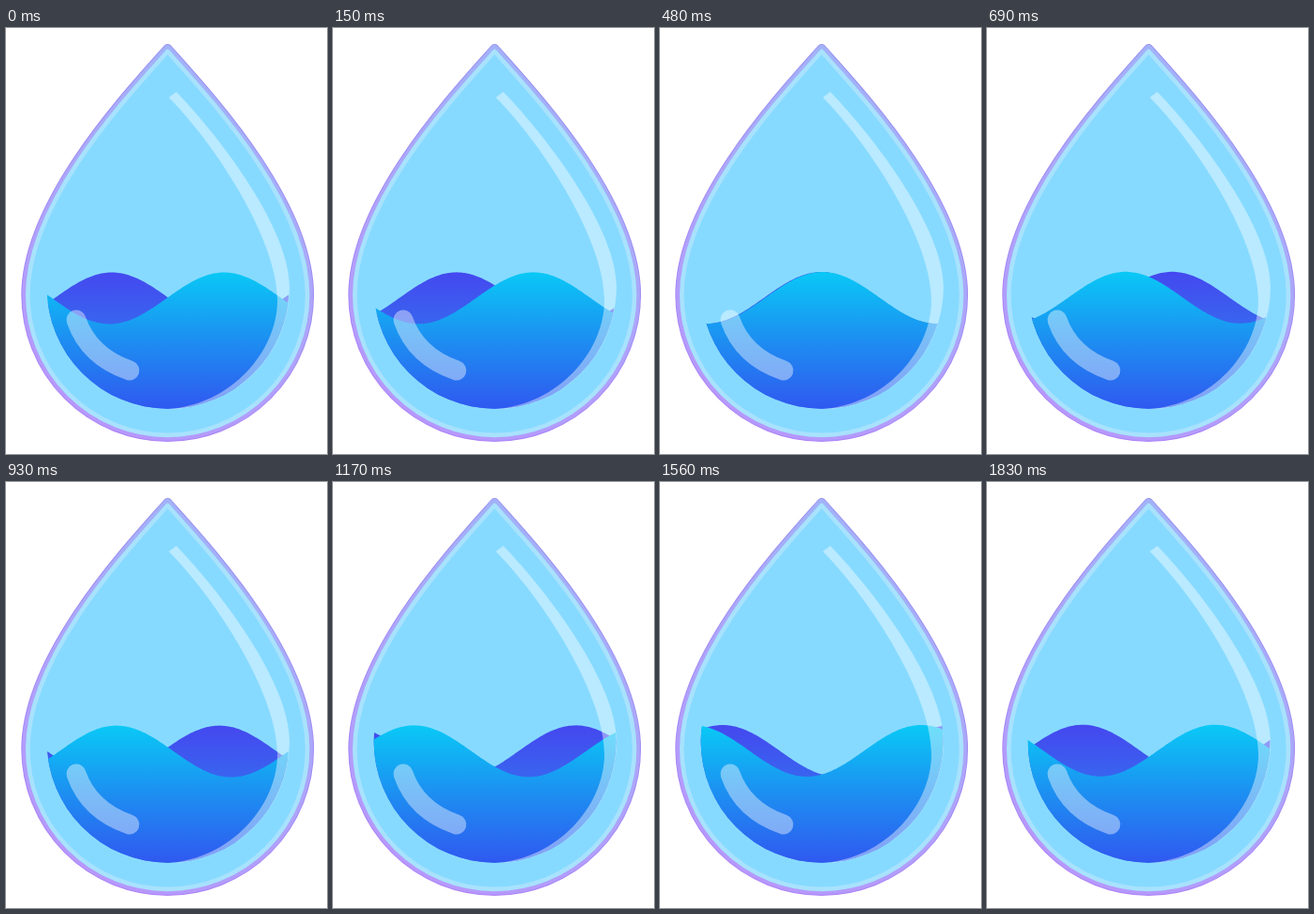
These frames come from a looping animation (343x454 px, 1860 ms). An HTML page with a canvas:

```html
<!DOCTYPE html>
<html lang="en">
<head>
<meta charset="utf-8">
<title>Water drop</title>
<style>
  html, body { margin: 0; width: 100%; height: 100%; overflow: hidden; background: #fff; }
  canvas { display: block; width: 343px; height: 454px; }
</style>
</head>
<body>
<canvas id="stage"></canvas>
<script>
const W = 343, H = 454, LOOP = 1860, STEP = 30;
const canvas = document.getElementById('stage');
const ctx = canvas.getContext('2d');
const dpr = window.devicePixelRatio || 1;
canvas.width = W * dpr;
canvas.height = H * dpr;
ctx.scale(dpr, dpr);

const CX = 172.7;
const BOWL = { x: 173, y: 276.3, r: 129.4 };
const WAVE = { mid: 288, rise: 1.8, amp: 27.5, len: 245, start: 233, speed: 0.128, sway: 2 };

function gradient(x0, y0, x1, y1, ...colors) {
  const g = ctx.createLinearGradient(x0, y0, x1, y1);
  colors.forEach((c, i) => g.addColorStop(i / (colors.length - 1), c));
  return g;
}
const frontFill = gradient(0, 258, 0, 408, '#09caf6', '#1d8ef1', '#3057f0');
const backFill = gradient(0, 258, 0, 318, '#4547ef', '#3866ef');
const rimFill = gradient(250, 60, 60, 400, '#a2b2f8', '#b698fc');
const edgeFill = gradient(250, 60, 60, 400, '#9a92f0', '#ab80f8');

function dropPath(inset) {
  const r = 156.4 - inset, tip = 14.5 + inset * 1.5, y = 284.5;
  const p = new Path2D();
  p.moveTo(CX, tip);
  p.bezierCurveTo(CX + 42, tip + 47, CX + r, 185, CX + r, y);
  p.arc(CX, y, r, 0, Math.PI);
  p.bezierCurveTo(CX - r, 185, CX - 42, tip + 47, CX, tip);
  p.closePath();
  return p;
}

const rim = dropPath(5), body = dropPath(7);

const bowl = new Path2D();
bowl.arc(BOWL.x, BOWL.y, BOWL.r, 0, Math.PI * 2);

// long highlight that tapers into a crescent along the bowl
const shine = new Path2D('M174 74L182 68C232 120 303 215 303 276A130 130 0 0 1 173 406' +
  'C240 402 290 345 290 290C290 228 228 129 174 74Z');
const glint = new Path2D('M75 311Q88.5 350 132 365');

function outline(path, width, style) {
  ctx.strokeStyle = style;
  ctx.lineWidth = width;
  ctx.stroke(path);
}

function wave(crest, mid, fill) {
  ctx.beginPath();
  ctx.moveTo(40, 410);
  for (let x = 40; x <= 306; x += 2) {
    ctx.lineTo(x, mid - WAVE.amp * Math.cos((x - crest) * 2 * Math.PI / WAVE.len));
  }
  ctx.lineTo(306, 410);
  ctx.closePath();
  ctx.fillStyle = fill;
  ctx.fill();
}

function draw(ms) {
  ctx.fillStyle = '#fff';
  ctx.fillRect(0, 0, W, H);

  ctx.lineJoin = ctx.lineCap = 'round';
  outline(rim, 10, edgeFill);
  outline(rim, 8, rimFill);
  ctx.fillStyle = '#87daff';
  ctx.fill(body);
  outline(body, 4.6, '#a8e2fd');

  // the two waves mirror each other about the centre
  const part = ms / LOOP;
  const crest = WAVE.start - WAVE.speed * ms + WAVE.sway * (1 - Math.cos(2 * Math.PI * part));
  const mid = WAVE.mid - WAVE.rise * part;
  ctx.save();
  ctx.clip(bowl);
  wave(2 * BOWL.x - crest, mid, backFill);
  wave(crest, mid, frontFill);
  ctx.restore();

  const gloss = 'rgba(255,255,255,0.41)';
  ctx.fillStyle = gloss;
  ctx.fill(shine);
  outline(glint, 21, gloss);
}

function tick() {
  const t = performance.now() % LOOP;
  draw(Math.floor(t / STEP) * STEP);
  requestAnimationFrame(tick);
}
tick();
</script>
</body>
</html>
```
